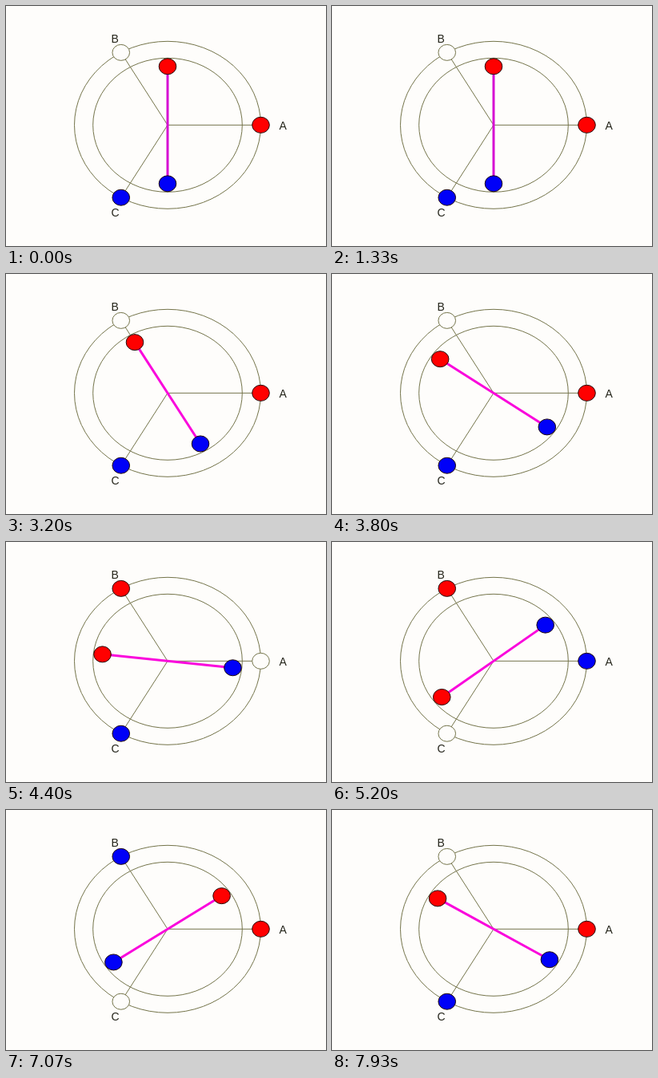
These frames come from a looping animation (400 by 301 pixels, 8000 ms). An HTML page with a canvas:

```html
<!DOCTYPE html>
<html lang="en">
<head>
<meta charset="utf-8">
<title>Three-phase motor</title>
<style>
html, body { margin: 0; width: 100%; height: 100%; overflow: hidden; background: #fefdfb; }
canvas { display: block; }
</style>
</head>
<body>
<canvas id="stage" width="400" height="301"></canvas>
<script>
const ctx = document.getElementById('stage').getContext('2d');
const CX = 202, CY = 149.3, LOOP = 8000, FPS = 15, FRAMES = 120;
const RED = '#ff0000', BLUE = '#0000f8', OFF = '#fefdfb', OLIVE = '#74744a';

// Rotor angle in degrees at a few frames: at rest, then speeding up
const knots = [[0, 90], [24, 90], [36, 95], [48, 120], [66, 173.4],
  [76, 209.5], [90, 278], [106, 394.5], [119, 508.5]];

// Colours of A, B, C for each 60 degree sector, from 90 degrees on
const sectors = [
  [RED, OFF, BLUE], [OFF, RED, BLUE], [BLUE, RED, OFF],
  [BLUE, OFF, RED], [OFF, BLUE, RED], [RED, BLUE, OFF]
];

const slope = (i, j) => (knots[j][1] - knots[i][1]) / (knots[j][0] - knots[i][0]);

function tangent(i) {
  const last = knots.length - 1;
  if (i < 2) return 0;
  if (i === last) return slope(last - 1, last);
  const h0 = knots[i][0] - knots[i - 1][0], h1 = knots[i + 1][0] - knots[i][0];
  return (slope(i - 1, i) * h1 + slope(i, i + 1) * h0) / (h0 + h1);
}

function angleAt(n) {
  let i = 0;
  while (i < knots.length - 2 && n >= knots[i + 1][0]) i++;
  const [x0, y0] = knots[i], [x1, y1] = knots[i + 1];
  const h = x1 - x0, u = (n - x0) / h, w = 1 - u;
  return y0 + (y1 - y0) * u * u * (3 - 2 * u)
    + h * u * w * (tangent(i) * w - tangent(i + 1) * u);
}

function polar(deg, rx, ry) {
  const a = deg * Math.PI / 180;
  return [CX + rx * Math.cos(a), CY - ry * Math.sin(a)];
}

function line(from, to, color, width) {
  ctx.strokeStyle = color;
  ctx.lineWidth = width;
  ctx.beginPath();
  ctx.moveTo(...from);
  ctx.lineTo(...to);
  ctx.stroke();
}

function oval([x, y], rx, ry, stroke, fill) {
  ctx.beginPath();
  ctx.ellipse(x, y, rx, ry, 0, 0, 2 * Math.PI);
  if (fill) {
    ctx.fillStyle = fill;
    ctx.fill();
  }
  ctx.strokeStyle = stroke;
  ctx.lineWidth = 1;
  ctx.stroke();
}

const ball = (p, fill) => oval(p, 10.8, 10, fill === OFF ? OLIVE : '#200808', fill);

function draw(n) {
  const angle = angleAt(n);
  const colors = sectors[Math.floor((angle - 90) / 60) % 6];
  const center = [CX, CY];
  ctx.fillStyle = OFF;
  ctx.fillRect(0, 0, 400, 301);

  oval(center, 116.5, 105, OLIVE);
  oval(center, 93.3, 84, OLIVE);
  colors.forEach((color, i) => {
    const p = polar(i * 120, 116.5, 105);
    line(center, p, OLIVE, 1);
    ball(p, color);
  });

  ctx.fillStyle = '#24241a';
  ctx.font = '14px "Liberation Sans", Arial, sans-serif';
  ctx.fillText('A', 341.5, 154.5);
  ctx.fillText('B', 131.5, 46);
  ctx.fillText('C', 131.5, 264);

  const north = polar(angle, 82, 73.5), south = polar(angle + 180, 82, 73.5);
  line(north, south, angle > 90 ? '#fa06dc' : '#d60cd2', 3);
  ball(north, RED);
  ball(south, BLUE);
}

function tick(now) {
  draw(Math.floor((now % LOOP + 4) * FPS / 1000) % FRAMES);
  requestAnimationFrame(tick);
}
requestAnimationFrame(tick);
</script>
</body>
</html>
```
